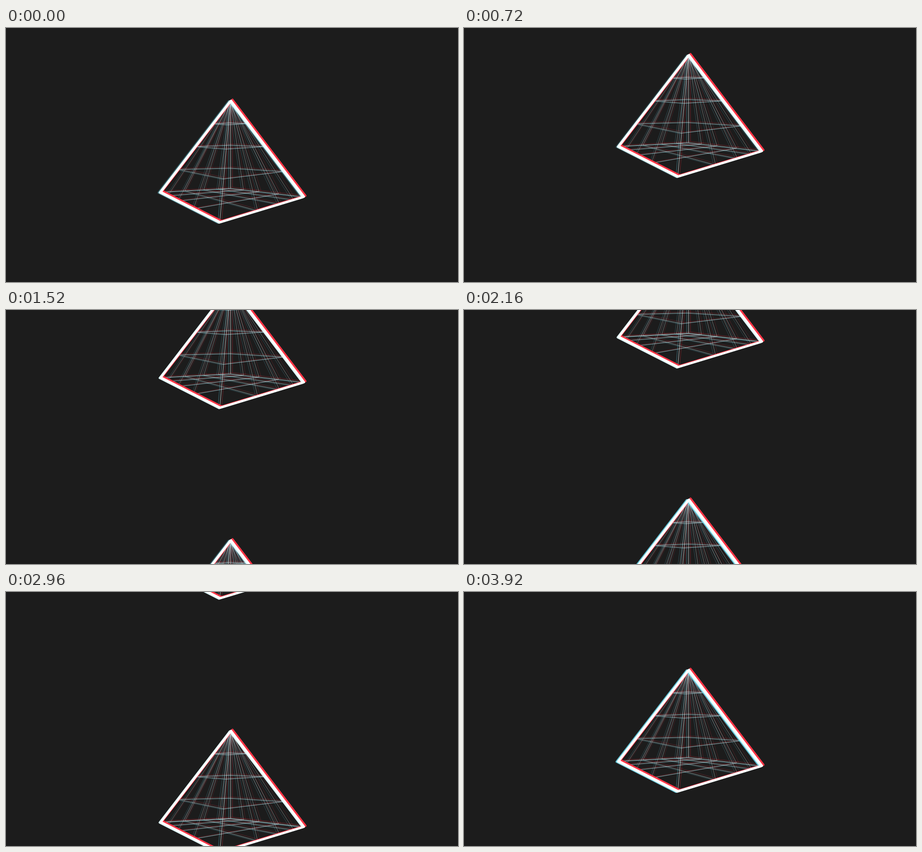
An HTML page with a canvas that plays this animation: 960x540 px, repeating every 4 s.

```html
<!DOCTYPE html>
<html>
<head>
<meta charset="utf-8">
<style>
html, body { margin: 0; height: 100%; overflow: hidden; background: #1c1c1c; }
canvas { display: block; }
</style>
</head>
<body>
<canvas id="stage" width="960" height="540"></canvas>
<script>
const ctx = document.getElementById('stage').getContext('2d');
const STEP = 80, STEPS = 50, HEIGHT = 540;

// Corners as x, y and relative depth
const apex = [477, 155, 1];
const left = [328, 349, 2.4], front = [454, 413, 1];
const right = [632, 359, 2.48], back = [477, 341, 3.88];

const mix = (a, b, t) => a + (b - a) * t;
const between = (p, q, s) => [mix(p[0], q[0], s), mix(p[1], q[1], s)];

// Point at 3D fraction t along an edge, seen in perspective
const along = (p, q, t) => between(p, q, t * q[2] / mix(p[2], q[2], t));

const quarters = [0.25, 0.5, 0.75];
const split = (p, q) => quarters.map(t => along(p, q, t));
const frontRight = split(front, right), frontLeft = split(front, left);
const leftBack = split(left, back), rightBack = split(right, back);

const makePath = (...lines) => {
  const path = new Path2D();
  for (const line of lines)
    line.forEach((p, i) => i ? path.lineTo(p[0], p[1]) : path.moveTo(p[0], p[1]));
  return path;
};

const fan = makePath(...[frontRight, frontLeft, leftBack, rightBack].flat().map(p => [apex, p]));
const rings = [
  [0.25, 0.196, 0.235, 0.25],
  [0.5, 0.396, 0.475, 0.505],
  [0.75, 0.642, 0.735, 0.768]
].map(f => {
  const ring = [left, front, right, back].map((p, i) => between(apex, p, f[i]));
  return [...ring, ring[0]];
});
const grid = makePath(
  ...rings,
  ...frontRight.map((p, i) => [p, leftBack[i]]),
  ...frontLeft.map((p, i) => [p, rightBack[i]])
);
const edges = makePath([left, back, right], [apex, front], [apex, back]);
const outline = makePath([apex, left, front, right, apex, left]);

// Strength of the cyan fringe: step, opacity
const fringe = [[0, .35], [19, .35], [27, .9], [37, 0], [49, .9], [50, .4],
  [55, 0], [63, .4], [69, 0], [100, 0]];

function fringeAt(age) {
  const i = Math.max(1, fringe.findIndex(k => k[0] >= age));
  const [a, from] = fringe[i - 1], [b, to] = fringe[i];
  return mix(from, to, (age - a) / (b - a));
}

function stroke(path, width, alpha) {
  ctx.lineWidth = width;
  ctx.globalAlpha = alpha;
  ctx.stroke(path);
}

function pen(color, dx, dy) {
  ctx.setTransform(1, 0, 0, 1, dx, dy);
  ctx.strokeStyle = color;
}

function wires(color, dx, dy, strength) {
  pen(color, dx, dy);
  stroke(fan, 0.9, 0.42 * strength);
  stroke(grid, 1, 0.5 * strength);
  stroke(edges, 1.1, 0.65 * strength);
}

function frame(color, dx, dy, alpha) {
  pen(color, dx, dy);
  stroke(outline, 4.5, alpha);
}

function pyramid(y, age) {
  wires('#ff3546', 4, y - 2.5, 0.5);
  wires('#62cfe4', -4, y + 1, 0.65);
  wires('#f8ffff', 0, y, 1);
  frame('#ff3546', 4, y - 2.5, 1);
  frame('#62cfe4', -4, y + 1, fringeAt(age));
  frame('#defbfd', -1.5, y + 0.8, 1);
  frame('#ffffff', 1, y - 0.3, 1);
}

ctx.lineJoin = 'round';

function draw(now) {
  const step = Math.floor(now / STEP) % STEPS;
  const scroll = step * HEIGHT / STEPS;
  ctx.setTransform(1, 0, 0, 1, 0, 0);
  ctx.globalAlpha = 1;
  ctx.fillStyle = '#1c1c1c';
  ctx.fillRect(0, 0, 960, HEIGHT);
  pyramid(-scroll, step + STEPS);
  pyramid(HEIGHT - scroll, step);
}

const start = performance.now();
function tick() {
  draw(performance.now() - start);
  requestAnimationFrame(tick);
}
tick();
</script>
</body>
</html>
```
